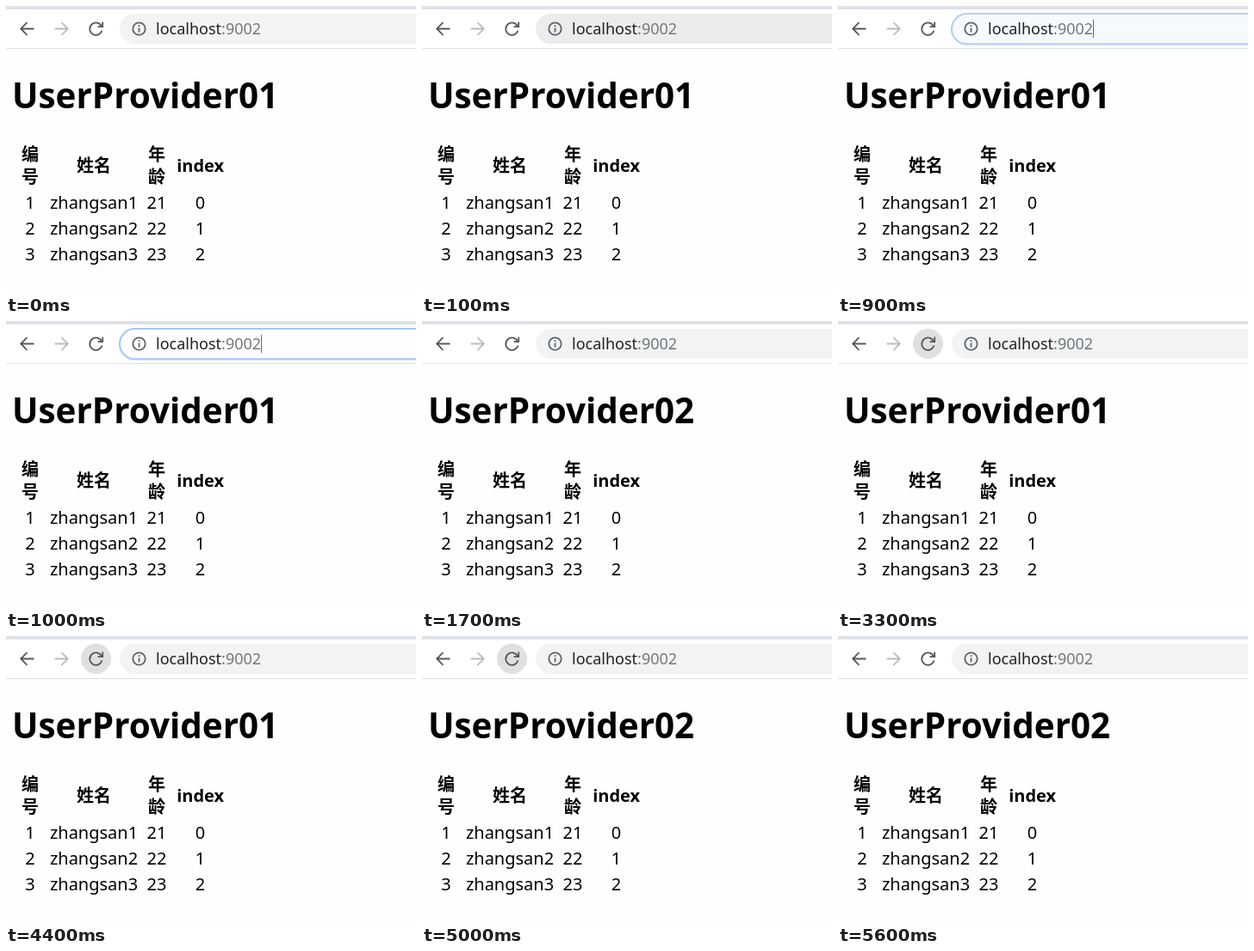
An HTML page for the animation above (5.7 s loop, 476x334 px).

```html
<!DOCTYPE html>
<html lang="zh-CN">
<head>
<meta charset="utf-8">
<title>UserProvider</title>
<style>
  html, body { margin: 0; width: 100%; height: 100%; overflow: hidden; background: #fdfefe; }
  svg { display: block; width: 476px; height: 334px; }
  text { font-family: "Noto Sans", "Noto Sans CJK SC", "Noto Sans CJK", sans-serif; font-size: 20px; }
  #table text { text-anchor: middle; }
  #table .head { font-weight: 700; }
  #title { font-size: 40.4px; font-weight: 700; }
  #url { font-size: 18px; fill: #202124; }
  #url tspan { fill: #73777b; }
</style>
</head>
<body>
<svg viewBox="0 0 476 334">
  <rect width="476" height="50" fill="#fff"/>
  <rect width="476" height="4" fill="#dee1e6"/>
  <rect y="49" width="476" height="1" fill="#dfe1e3"/>

  <circle id="hover" cx="104.5" cy="26.5" r="17.5" fill="#dfe0e1"/>
  <g fill="none" stroke="#55595e" stroke-width="1.8">
    <path d="M32.5 26.5H18M24.5 19.2l-7.3 7.3 7.3 7.3"/>
    <path stroke="#babcbe" d="M56.5 26.5H71M64.5 19.2l7.3 7.3-7.3 7.3"/>
    <path d="M111 23.6A7.2 7.2 0 1 0 111.4 28.6M112.2 18.5v5.7h-5.7"/>
  </g>

  <rect id="bar" x="132" y="9" width="400" height="35" rx="17.5"/>
  <rect id="ring" x="132" y="9" width="400" height="35.4" rx="17.7" stroke-width="2.2"/>
  <g fill="none" stroke="#5f6368" stroke-width="1.8">
    <circle cx="154.5" cy="26.5" r="7.2"/>
    <path d="M154.5 25.5v5M154.5 22.3v1.8"/>
  </g>
  <text id="url" x="174" y="33">localhost<tspan>:9002</tspan></text>
  <rect id="caret" x="296" y="16" width="1" height="21" fill="#66696d"/>

  <text id="title" x="7" y="119">UserProvider01</text>
  <g id="table"></g>
</svg>
<script>
  const LOOP = 5700;
  const byId = id => document.getElementById(id);

  const columns = [28, 102, 175, 225.6];
  const addText = (text, x, y, className = "") => {
    const node = document.createElementNS("http://www.w3.org/2000/svg", "text");
    node.setAttribute("x", x);
    node.setAttribute("y", y);
    node.setAttribute("class", className);
    node.textContent = text;
    byId("table").append(node);
  };

  [["编", 0, 180], ["号", 0, 206], ["姓名", 1, 193], ["年", 2, 180], ["龄", 2, 206], ["index", 3, 193]]
    .forEach(([text, column, y]) => addText(text, columns[column], y, "head"));
  for (let i = 0; i < 3; i++) {
    [i + 1, `zhangsan${i + 1}`, 21 + i, i]
      .forEach((text, column) => addText(text, columns[column], 236 + 30 * i));
  }

  // Each track lists [start time in ms, value].
  const idle = { fill: "#f1f3f4", ring: "none", caret: 0 };
  const barTrack = [
    [0, idle],
    [100, { fill: "#ebeced", ring: "none", caret: 0 }],
    [900, { fill: "#f7fafd", ring: "#b3cff3", caret: 1 }],
    [1000, { fill: "#ffffff", ring: "#a8c7f7", caret: 1 }],
    [1700, idle]
  ];
  const hoverTrack = [[0, 0], [3100, 0.5], [3200, 1], [5600, 0]];
  const serverTrack = [0, 1700, 3300, 3600, 3800, 4100, 4400, 4600, 4800, 5000]
    .map((time, i) => [time, 1 + i % 2]);

  const valueAt = (track, time) => track.filter(([start]) => start <= time).pop()[1];

  function draw(time) {
    const bar = valueAt(barTrack, time);
    byId("bar").setAttribute("fill", bar.fill);
    byId("ring").setAttribute("fill", bar.ring === "none" ? "none" : bar.fill);
    byId("ring").setAttribute("stroke", bar.ring);
    byId("caret").setAttribute("opacity", bar.caret);
    byId("hover").setAttribute("opacity", valueAt(hoverTrack, time));
    byId("title").textContent = `UserProvider0${valueAt(serverTrack, time)}`;
  }

  const startTime = performance.now();
  function tick() {
    draw((performance.now() - startTime) % LOOP);
    requestAnimationFrame(tick);
  }
  draw(0);
  requestAnimationFrame(tick);
</script>
</body>
</html>
```
